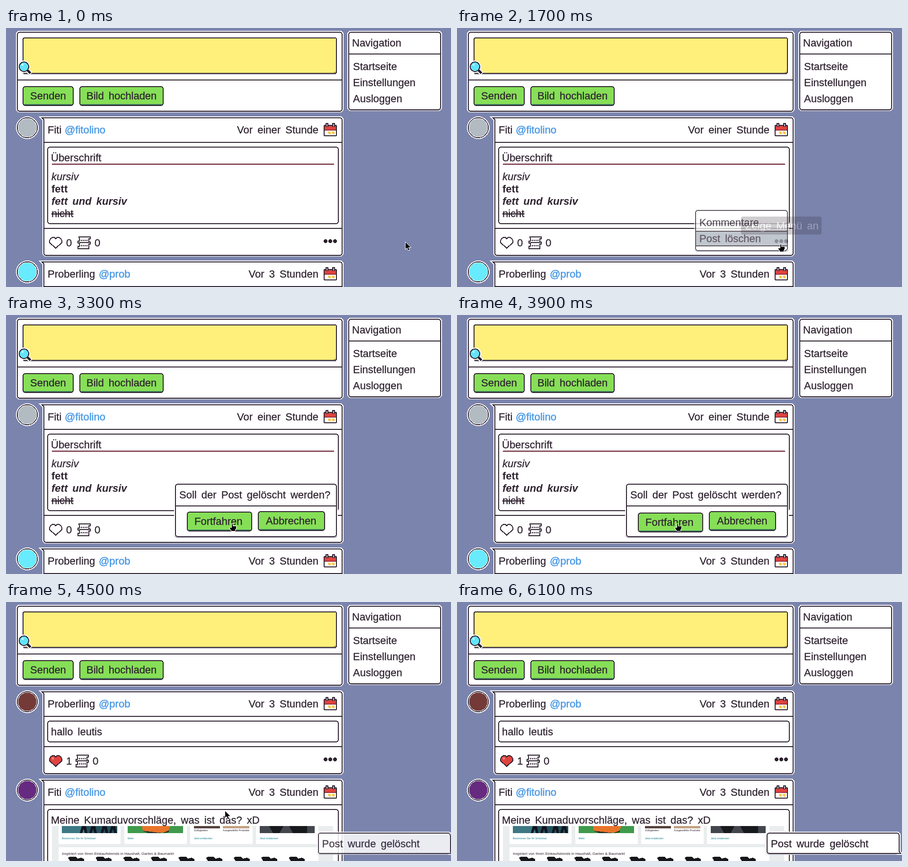
Recreate the animation shown at these times as an HTML page. Size 940 px wide and 548 px high, loop 6.4 s.

```html
<!DOCTYPE html>
<html lang="de">
<head>
<meta charset="utf-8">
<style>
html, body { margin: 0; width: 100%; height: 100%; overflow: hidden; background: #7a84ad; }
svg { display: block; width: 100vw; height: 100vh; shape-rendering: crispEdges; }
text { font: 22px "Liberation Sans", Arial, sans-serif; word-spacing: 4px; fill: #2e222f; stroke: #2e222f; stroke-width: .3px; }
.tag { fill: #4d9be6; stroke: #4d9be6; stroke-width: .6px; }
.i { font-style: italic; }
.b { font-weight: bold; stroke: none; }
.s { text-decoration: line-through; }
.end { text-anchor: end; }
.tip { fill: #fff; stroke: none; }
.small { font-size: 5.6px; word-spacing: 0; stroke: none; }
.head { font-size: 8px; word-spacing: 0; stroke: none; }
.link { fill: #0b7c8c; }
</style>
</head>
<body>
<svg id="stage" viewBox="0 0 940 548"></svg>
<script>
const INK = '#2e222f', GREEN = '#86df57';
const LOOP = 6400, STEP = 100;

const rect = (x, y, w, h, fill, rx = 0) =>
  `<rect x="${x}" y="${y}" width="${w}" height="${h}" rx="${rx}" fill="${fill}"/>`;
const text = (x, y, s, cls = '') => `<text x="${x}" y="${y}" class="${cls}">${s}</text>`;
const path = (d, fill, stroke = 'none', width = 2) =>
  `<path d="${d}" fill="${fill}" stroke="${stroke}" stroke-width="${width}"/>`;
const dot = (x, y, r, fill) => `<circle cx="${x}" cy="${y}" r="${r}" fill="${fill}"/>`;
const at = (x, y, s) => `<g transform="translate(${x} ${y})">${s}</g>`;
const group = (id, s) => `<g id="${id}">${s}</g>`;

const frame = (x, y, w, h, fill = '#fff', rx = 6) =>
  rect(x, y, w, h, INK, rx) + rect(x + 2, y + 2, w - 4, h - 4, fill, rx - 2);
const card = (x, y, w, h) =>
  rect(x - 2, y, w + 4, h + 2, '#c3c4d0', 7) +
  rect(x - 2, y - 2, w + 4, h + 2, '#fff', 7) + frame(x, y, w, h);
const rule = (x, y, w) => rect(x, y - 1, w, 2, INK);
const button = (x, y, w, label, tx) =>
  frame(x, y, w, 42, GREEN, 6) + rect(x + 3, y + 38, w - 6, 2, '#3d7a62') + text(tx, y + 28, label);
const corner = (d) => path(d, '#fff', '#fff', 6) + path(d, '#fff', INK);

const calendar = (y) => at(671, y,
  rect(-2, 2, 32, 27, '#fff', 3) + frame(0, 4, 28, 24, '#fff', 3) +
  rect(2, 6, 24, 9, '#e0433f') + rect(2, 14, 24, 2, '#9c2c3a') +
  [5, 19].map(x => rect(x - 1, 0, 6, 8, INK) + rect(x + 1, 2, 2, 5, '#c9ccd6')).join('') +
  [9, 17].map(x => rect(x, 18, 6, 4, '#ffc94d') + rect(x + 2, 21, 4, 3, '#ffc94d')).join(''));

const heart = (fill) => path('M1 8L3 4L7 1H11L14 4L17 1H21L25 4L27 8V12L14 24L1 12Z', fill, INK);

const scroll = path('M3 1H27V5H24V12H27V16H24V26H1V21H4V14H1V10H4V5Z', '#fff', INK) +
  rect(4, 12, 20, 2, INK) +
  [0, 1, 2, 3].map(i => rect(7 + i * 4, 7, 2, 3, INK) + rect(7 + i * 4, 18, 2, 3, INK)).join('');

const avatar = (y, fill) =>
  dot(45, y, 24, '#fff') + dot(45, y, 22, INK) + dot(45, y, 20.5, '#fff') + dot(45, y, 19.5, fill);

function post(y, h, name, tag, tagX, when, color, body) {
  return avatar(y + 22, color) + card(79, y, 632, h) +
    corner(`M84 ${y + 1}H76L80 ${y + 5}V${y + 10}`) +
    text(88, y + 34, name) + text(tagX, y + 34, tag, 'tag') +
    text(660, y + 34, when, 'end') + calendar(y + 12) + rule(81, y + 53, 628) + body;
}

const footer = (y, likes, shift, fill) =>
  rule(81, y, 628) + at(91, y + 18, heart(fill)) + text(127, y + 38, likes) +
  at(151 - shift, y + 17, scroll) + text(187 - shift, y + 38, '0') +
  [675, 685, 695].map(x => dot(x, y + 27, 4, INK)).join('');

const proberling = (y, h, color, body) =>
  post(y, h, 'Proberling', '@prob', 196, 'Vor 3 Stunden', color, body);
const fiti = (y, h, when, color, body) => post(y, h, 'Fiti', '@fitolino', 124, when, color, body);

const composer = card(23, 8, 688, 169) + rule(25, 110, 684) +
  frame(35, 20, 664, 77, '#fff07c', 4) + rect(37, 97, 660, 2, '#c3c4d0') +
  path('M696 90V95H691Z', '#c9b955') +
  path('M45 89L53 97', 'none', '#fff', 9) + dot(38, 82, 13, '#fff') +
  path('M45 89L52 96', 'none', INK, 5) + dot(38, 82, 11, INK) + dot(38, 82, 9, '#62e4fb') +
  rect(33, 76, 4, 4, '#c5f8ff') +
  button(35, 123, 108, 'Senden', 51) + button(155, 123, 178, 'Bild hochladen', 170);

const nav = card(723, 8, 196, 166) + rule(725, 55, 192) + text(731, 39, 'Navigation') +
  ['Startseite', 'Einstellungen', 'Ausloggen'].map((s, i) => text(733, 89 + 34 * i, s)).join('');

const before = fiti(189, 293, 'Vor einer Stunde', '#b2bbc2',
  frame(87, 251, 616, 164) + text(95, 282, 'Überschrift') +
  rect(97, 287, 596, 2, '#6e2738') + rect(97, 289, 596, 1, '#d9bcc4') +
  ['i', 'b', 'b i', 's'].map((c, i) =>
    text(96, 322 + 26 * i, ['kursiv', 'fett', 'fett und kursiv', 'nicht'][i], c)).join('') +
  footer(424, '0', 0, '#fff')) +
  proberling(494, 200, '#68ebff', rule(81, 547, 628));

// Shop page screenshot, reduced to flat shapes
const shop = rect(97, 474, 594, 74, '#eaeded') +
  [[111, 131], [250, 132], [389, 132], [528, 132]].map(([x, w]) => rect(x, 474, w, 38, '#fff')).join('') +
  rect(118, 474, 117, 15, '#24505e') + rect(118, 474, 50, 15, '#3d7884') +
  [160, 180, 204, 222].map(x => path(`M${x} 474h9l3 15h-5l-3-9-3 9h-5z`, '#10171f')).join('') +
  rect(257, 474, 117, 15, '#3f9a4b') + path('M287 474H347L343 484L331 488H300L289 483Z', '#e8742a') +
  path('M289 484L331 489L344 483V487L332 489H300Z', '#24352e') +
  rect(397, 474, 55, 5, '#57423f') + rect(458, 474, 56, 5, '#c4a183') +
  rect(536, 474, 116, 15, '#43474d') + path('M556 474h30l-8 15h-14z M598 474h38v15h-30z', '#17191d') +
  text(397, 485, 'Süßigkeiten', 'small') + text(458, 485, 'Ausgewählte Produkte', 'small') +
  [[118, 'Bestimmen Sie Ihr Schicksal'], [257, 'Mehr'], [397, 'Jetzt entdecken'], [536, 'Jetzt entdecken']]
    .map(([x, s]) => text(x, 502, s, 'small link')).join('') +
  rect(111, 519, 549, 29, '#fff') +
  text(118, 535, 'Inspiriert von Ihren Einkaufstrends in Haushalt, Garten &amp; Baumarkt', 'head') +
  [...Array(9).keys()].map(i =>
    path(`M${131 + 58.3 * i} 541l4-2 12 0 4 4 8-2 6 3v4h-30z`, '#17171b')).join('');

const after = proberling(189, 175, '#743a38',
  frame(87, 251, 616, 46) + text(95, 282, 'hallo leutis') + footer(306, '1', 4, '#e0433f') +
  rect(97, 329, 4, 4, '#f58b83')) +
  fiti(376, 300, 'Vor 3 Stunden', '#662a80',
    frame(87, 438, 616, 200) + text(95, 469, 'Meine Kumaduvorschläge, was ist das? xD') + shop);

const menu = card(503, 383, 196, 87) +
  group('row', rect(505, 427, 192, 33, INK) + rect(505, 429, 192, 29, '#adb5be')) +
  text(512, 417, 'Kommentare') + text(512, 451, 'Post löschen');

const dialog = card(357, 357, 342, 113) + text(366, 388, 'Soll der Post gelöscht werden?') +
  rule(359, 404, 338) + group('confirm', button(382, 416, 138, 'Fortfahren', 398)) +
  button(532, 415, 142, 'Abbrechen', 549);

const toast = card(654, 488, 281, 45) + corner('M929 532H937L934 528V522') + text(663, 519, 'Post wurde gelöscht');

const arrow = path('M0 0V17L4 13L7 19L10 18L7 12H12Z', '#000', '#fff', 1);
const hand = path('M-1 0H2V5L9 6V11L7 16H-1L-5 10V8H-1Z', '#000', '#fff', 1);

document.getElementById('stage').innerHTML = composer + nav +
  group('before', before) + group('after', after) + group('menu', menu) + group('dialog', dialog) +
  group('tip', rect(600, 399, 170, 38, '#332c36', 4) + text(609, 426, 'Zeige Menü an', 'tip')) +
  group('toast', toast) + group('cursor', group('arrow', arrow) + group('hand', hand));

const $ = Object.fromEntries([...document.querySelectorAll('g[id]')].map(g => [g.id, g]));
const show = (g, on) => { g.style.display = on ? '' : 'none'; };
const move = (g, x, y) => g.setAttribute('transform', `translate(${x} ${y})`);

// Eased value along keys of [time, ...values]
function track(keys, t) {
  const i = keys.findIndex(k => k[0] > t);
  if (i < 0) return keys[keys.length - 1].slice(1);
  if (i === 0) return keys[0].slice(1);
  const a = keys[i - 1], b = keys[i];
  const u = (t - a[0]) / (b[0] - a[0]), e = u * u * (3 - 2 * u);
  return a.slice(1).map((v, n) => v + (b[n + 1] - v) * e);
}

const cursorKeys = [
  [0, 843, 452], [100, 844, 452], [200, 844, 452], [900, 731, 457], [1200, 686, 457],
  [1600, 683, 457], [2000, 683, 457], [2100, 674, 462], [2200, 645, 462], [2300, 605, 452],
  [2400, 569, 444], [2800, 569, 444], [3300, 477, 441], [3400, 477, 441], [4100, 462, 441],
  [5400, 462, 441], [6000, 3, 2]
];
const menuKeys = [[1500, 0, 12], [1600, .35, 7], [1700, .75, 2], [1800, 1, 0]];
const dialogKeys = [[2800, .67, 3], [2900, 1, 0]];
const tipKeys = [[1000, 0], [1300, 1], [1500, 1], [1600, .6], [1700, .23], [1800, 0]];
const toastKeys = [[4200, .03], [4300, .3], [4400, .6], [4500, .85], [4600, .96], [4700, 1]];

function draw(now) {
  const t = Math.floor(now % LOOP / STEP) * STEP;
  const [x, y] = track(cursorKeys, t).map(Math.round);
  move($.cursor, x, y);
  show($.cursor, t < 6100);
  const pointing = t >= 1100 && t < 4200;
  show($.hand, pointing);
  show($.arrow, !pointing);

  show($.before, t < 4200);
  show($.after, t >= 4400);

  const [menuAlpha, menuY] = track(menuKeys, t);
  show($.menu, t >= 1600 && t < 2800);
  $.menu.style.opacity = menuAlpha;
  move($.menu, 0, menuY);
  show($.row, y < 460);

  const [dialogAlpha, dialogY] = track(dialogKeys, t);
  show($.dialog, t >= 2800 && t < 4200);
  $.dialog.style.opacity = dialogAlpha;
  move($.dialog, 0, dialogY);
  move($.confirm, 0, t >= 3800 && t < 4000 ? 2 : 0);

  $.tip.style.opacity = track(tipKeys, t)[0];
  const [toastAlpha] = track(toastKeys, t);
  show($.toast, t >= 4200);
  $.toast.style.opacity = toastAlpha;
  move($.toast, 30 * (1 - toastAlpha), 0);
}

const start = performance.now();
function tick() {
  draw(performance.now() - start);
  requestAnimationFrame(tick);
}
tick();
</script>
</body>
</html>
```
